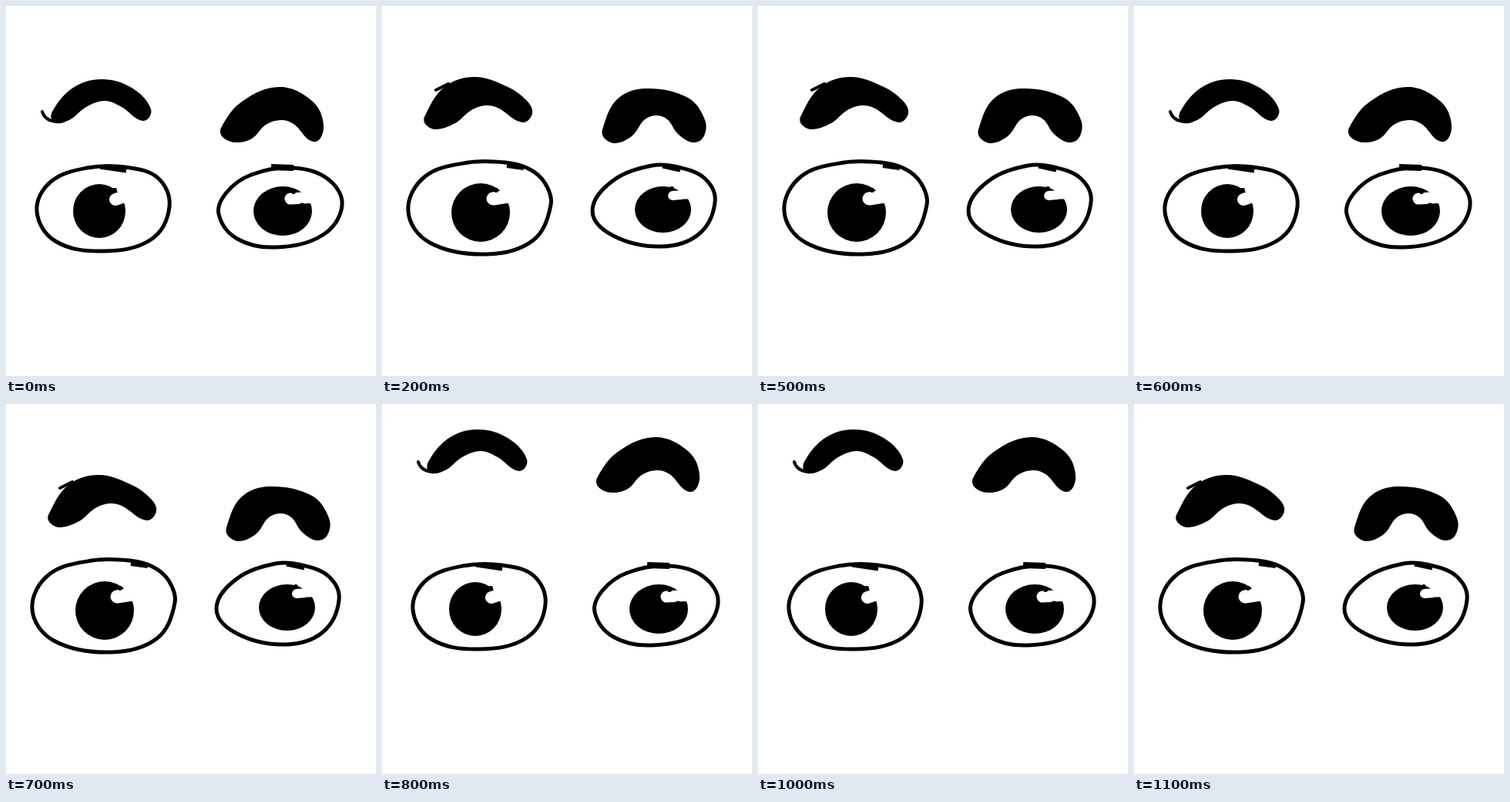
An HTML page with a canvas that plays this animation: 480x480 px, repeating every 1.2 s.

```html
<!DOCTYPE html>
<html lang="en">
<head>
<meta charset="utf-8">
<title>Eyebrow waggle</title>
<style>
html, body { margin: 0; width: 100%; height: 100%; overflow: hidden; background: #fff; }
canvas { display: block; width: 480px; height: 480px; }
</style>
</head>
<body>
<canvas id="stage" width="480" height="480"></canvas>
<script>
const ctx = document.getElementById('stage').getContext('2d');
const INK = '#000', PAPER = '#fff';
let lift = 0;

// Smooth closed curve; handles follow the neighbours and scale with each span.
function loop(xy) {
  const n = xy.length / 2;
  const pt = i => { const k = (i + n) % n * 2; return [xy[k], xy[k + 1]]; };
  const dir = i => {
    const [ax, ay] = pt(i - 1), [bx, by] = pt(i + 1);
    const d = Math.hypot(bx - ax, by - ay);
    return [(bx - ax) / d, (by - ay) / d];
  };
  ctx.beginPath();
  ctx.moveTo(...pt(0));
  for (let i = 0; i < n; i++) {
    const [ax, ay] = pt(i), [bx, by] = pt(i + 1);
    const [ux, uy] = dir(i), [vx, vy] = dir(i + 1);
    const h = Math.hypot(bx - ax, by - ay) * 0.35;
    ctx.bezierCurveTo(ax + ux * h, ay + uy * h, bx - vx * h, by - vy * h, bx, by);
  }
  ctx.closePath();
}

function line(color, width, cap, x, y, x2, y2) {
  ctx.strokeStyle = color;
  ctx.lineWidth = width;
  ctx.lineCap = cap;
  ctx.beginPath();
  ctx.moveTo(x, y);
  ctx.lineTo(x2, y2);
  ctx.stroke();
}

function dot(x, y, rx, ry = rx) {
  ctx.fillStyle = INK;
  ctx.beginPath();
  ctx.ellipse(x, y, rx, ry, 0, 0, Math.PI * 2);
  ctx.fill();
}

function brow(...xy) {
  ctx.save();
  ctx.translate(0, -lift);
  loop(xy);
  ctx.fillStyle = INK;
  ctx.fill();
  ctx.restore();
}

function tail(x, y, cx, cy, x2, y2) {
  ctx.save();
  ctx.translate(0, -lift);
  ctx.strokeStyle = INK;
  ctx.lineWidth = 4;
  ctx.lineCap = 'round';
  ctx.beginPath();
  ctx.moveTo(x, y);
  ctx.quadraticCurveTo(cx, cy, x2, y2);
  ctx.stroke();
  ctx.restore();
}

function lid(...xy) {
  loop(xy);
  ctx.strokeStyle = INK;
  ctx.lineWidth = 5;
  ctx.stroke();
}

const overlap = (width, ...ends) => line(INK, width, 'butt', ...ends);

// Disc with a bite that opens to the right, and round tips on both sides of it.
function pupil(x, y, rx, ry, bite, bx, by, ox, oy, topX, topY, lowX, lowY) {
  dot(x, y, rx, ry);
  line(PAPER, bite, 'round', bx, by, ox, oy);
  dot(topX, topY, 3);
  dot(lowX, lowY, 3.5);
}

function poseA() {
  brow(60, 137, 87, 106, 124, 95, 163, 106, 188, 134, 178, 149, 150, 131, 128, 123, 104, 131, 82, 148, 62, 151);
  tail(47, 137, 50, 148, 64, 150);
  brow(279, 158, 306, 124, 355, 105, 398, 124, 412, 156, 400, 176, 373, 153, 357, 148, 337, 154, 319, 172, 298, 177, 281, 170);
  lid(105, 210, 155, 209, 197, 223, 212, 260, 188, 303, 125, 318, 64, 305, 40, 266, 58, 228);
  overlap(5, 122, 209, 156, 214);
  lid(372, 210, 417, 224, 436, 258, 411, 297, 350, 313, 300, 302, 276, 270, 286, 242, 318, 219);
  overlap(8, 344, 209, 373, 210);
  pupil(121, 266, 34, 35, 16, 142, 251, 165, 243, 141, 239, 151, 264);
  pupil(359, 266, 38, 32, 15, 369, 250, 400, 248, 373, 241, 384, 259);
}

function poseB() {
  brow(55, 144, 81, 105, 120, 92, 161, 104, 187, 122, 195, 139, 182, 151, 150, 132, 134, 129, 116, 135, 95, 152, 70, 160, 57, 154);
  tail(70, 109, 78, 105, 86, 101);
  brow(286, 160, 305, 121, 342, 107, 397, 119, 419, 148, 417, 170, 403, 177, 384, 166, 370, 147, 355, 142, 340, 148, 325, 168, 303, 178, 288, 171);
  lid(112, 203, 160, 203, 190, 211, 211, 229, 219, 258, 196, 304, 136, 322, 62, 307, 34, 266, 56, 221);
  overlap(6, 162, 207, 184, 210);
  lid(384, 209, 419, 224, 432, 254, 411, 296, 362, 312, 300, 298, 273, 266, 299, 227, 350, 207);
  overlap(5, 364, 208, 387, 213);
  pupil(128, 268, 38, 38, 17, 144, 250, 170, 246, 148, 239, 158, 261);
  pupil(364.5, 264, 36.5, 30, 12, 377, 246, 400, 244, 376, 237, 391, 254);
}

function poseC() {
  brow(47, 152, 60, 136, 90, 103, 131, 92, 174, 104, 200, 140, 183, 158, 145, 134, 126, 130, 106, 136, 84, 156, 62, 166, 50, 161);
  brow(282, 157, 297, 136, 321, 114, 354, 107, 400, 128, 422, 157, 411, 179, 380, 160, 363, 157, 346, 162, 327, 176, 309, 181, 287, 173);
  lid(156, 204, 202, 223, 220, 258, 197, 305, 132, 322, 62, 307, 39, 264, 64, 221, 118, 205);
  overlap(6, 153, 204, 163, 206);
  lid(382, 215, 424, 230, 441, 258, 425, 286, 394, 306, 336, 321, 291, 308, 274, 276, 301, 231, 358, 212);
  overlap(5, 381, 215, 392, 217);
  pupil(127.5, 269.5, 35.5, 37.5, 15, 144, 252, 170, 250, 152, 240, 158, 264);
  pupil(361, 268, 36.5, 33, 14, 378, 249, 402, 246, 381, 238, 391, 259);
}

const STEP = 100, LIFT = 62;
const ORDER = 'ACBACBABACAB';
const RAISED = [8, 10];
const poses = { A: poseA, B: poseB, C: poseC };

function draw(step) {
  ctx.fillStyle = PAPER;
  ctx.fillRect(0, 0, 480, 480);
  lift = RAISED.includes(step) ? LIFT : 0;
  poses[ORDER[step]]();
}

const start = performance.now();
function tick() {
  const t = Math.max(0, performance.now() - start);
  draw(Math.floor(t / STEP) % ORDER.length);
  requestAnimationFrame(tick);
}
tick();
</script>
</body>
</html>
```
